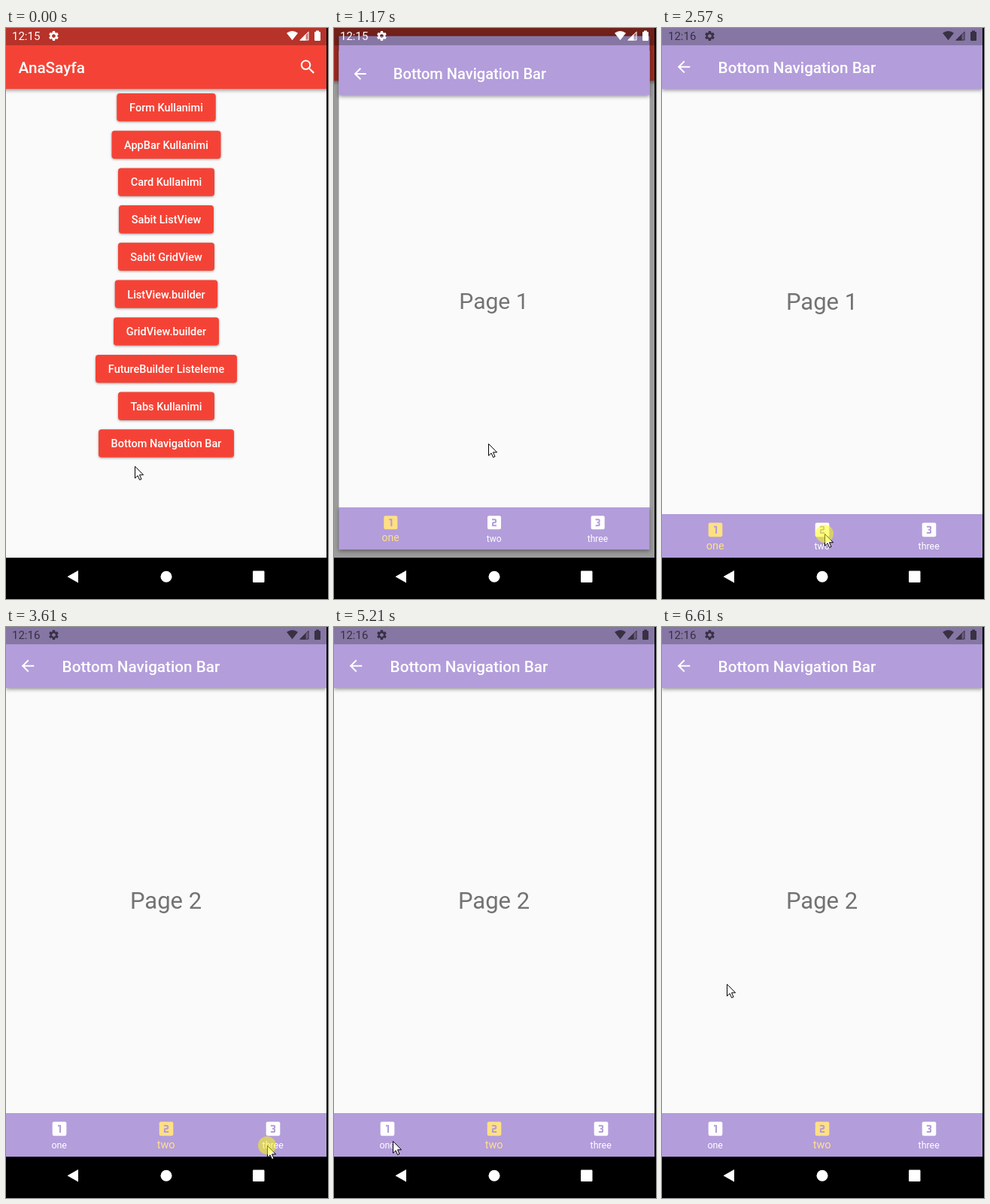
Write an HTML page that moves like this. It is 428 by 760 pixels and loops after 7010 ms.

```html
<!DOCTYPE html>
<html lang="tr">
<head>
<meta charset="utf-8">
<title>AnaSayfa</title>
<style>
  html, body { margin: 0; width: 100%; height: 100%; overflow: hidden; background: #000; }
  svg { display: block; width: 428px; height: 760px; font-family: Roboto, Arial, sans-serif; }
  .title { font-size: 20.7px; font-weight: 500; fill: #fff; }
  .label { font-size: 14.5px; font-weight: 500; fill: #fff; text-anchor: middle; }
  .page { font-size: 31px; fill: #737373; text-anchor: middle; }
  .tab { text-anchor: middle; }
  .btn { fill: #f44336; filter: drop-shadow(0 1.5px 1.5px rgba(0,0,0,.36)); }
  .bar { filter: drop-shadow(0 2px 2.5px rgba(0,0,0,.4)); }
</style>
</head>
<body>
<svg viewBox="0 0 428 760">
  <defs>
    <clipPath id="screen"><rect width="426" height="705"/></clipPath>
    <clipPath id="tabClip"><rect y="647" width="426" height="58"/></clipPath>
  </defs>
  <rect width="428" height="760"/>
  <g clip-path="url(#screen)">
    <g id="home">
      <rect width="426" height="705" fill="#fafafa"/>
      <g id="buttons"></g>
      <rect class="bar" x="-10" y="-10" width="446" height="91" fill="#f44336"/>
      <text class="title" x="16.6" y="59.5">AnaSayfa</text>
      <path transform="translate(388.7 39.4) scale(1.036)" fill="#fff" d="M15.5 14h-.79l-.28-.27C15.41 12.59 16 11.11 16 9.5 16 5.91 13.09 3 9.5 3S3 5.91 3 9.5 5.91 16 9.5 16c1.61 0 3.09-.59 4.23-1.57l.27.28v.79l5 4.99L20.49 19l-4.99-5zm-6 0C7.01 14 5 11.99 5 9.5S7.01 5 9.5 5 14 7.01 14 9.5 11.99 14 9.5 14z"/>
    </g>
    <rect id="scrim" width="426" height="705" fill="#000" opacity=".38"/>
    <g id="detail">
      <rect class="bar" y="647" width="426" height="58" fill="#b39ddb"/>
      <rect y="20" width="426" height="627" fill="#fafafa"/>
      <rect class="bar" width="426" height="81" fill="#b39ddb"/>
      <path transform="translate(16.6 39.4) scale(1.036)" fill="#fff" d="M20 11H7.83l5.59-5.59L12 4l-8 8 8 8 1.41-1.41L7.83 13H20v-2z"/>
      <text class="title" x="74.6" y="59.5">Bottom Navigation Bar</text>
      <text class="page" id="page" x="212.5" y="375"></text>
      <circle id="ripple" cy="676" fill="#ffe082" opacity=".14" clip-path="url(#tabClip)"/>
      <g id="tabs"></g>
    </g>
    <rect width="426" height="23" opacity=".25"/>
    <g id="status">
      <text id="clock" x="8" y="16" font-size="15"></text>
      <path transform="translate(55.4 2.5) scale(.67)" d="M19.14 12.94c.04-.3.06-.61.06-.94 0-.32-.02-.64-.07-.94l2.03-1.58c.18-.14.23-.41.12-.61l-1.92-3.32c-.12-.22-.37-.29-.59-.22l-2.39.96c-.5-.38-1.03-.7-1.62-.94l-.36-2.54c-.04-.24-.24-.41-.48-.41h-3.84c-.24 0-.43.17-.47.41l-.36 2.54c-.59.24-1.13.57-1.62.94l-2.39-.96c-.22-.08-.47 0-.59.22L2.74 8.87c-.12.21-.08.47.12.61l2.03 1.58c-.05.3-.09.63-.09.94s.02.64.07.94l-2.03 1.58c-.18.14-.23.41-.12.61l1.92 3.32c.12.22.37.29.59.22l2.39-.96c.5.38 1.03.7 1.62.94l.36 2.54c.05.24.24.41.48.41h3.84c.24 0 .44-.17.47-.41l.36-2.54c.59-.24 1.13-.56 1.62-.94l2.39.96c.22.08.47 0 .59-.22l1.92-3.32c.12-.22.07-.47-.12-.61l-2.01-1.58zM12 15.6c-1.98 0-3.6-1.62-3.6-3.6s1.62-3.6 3.6-3.6 3.6 1.62 3.6 3.6-1.62 3.6-3.6 3.6z"/>
      <path d="M373 6.8Q380.5 1.2 388 6.8L380.5 16.3Z"/>
      <path d="M390 16.5H402.5V4Z" opacity=".35"/>
      <path d="M390 16.5H398.5V8Z"/>
      <path d="M391.2 16H402V5.2Z" fill="none" stroke="currentColor" stroke-width=".9"/>
      <path d="M412 3.5h4v1.4h1q1 0 1 1V16q0 1-1 1h-6q-1 0-1-1V5.9q0-1 1-1h1z"/>
    </g>
  </g>
  <g fill="#fff">
    <path d="M81.5 730.3L96 722V738.6Z"/>
    <circle cx="213" cy="730.3" r="7.5"/>
    <rect x="328" y="722.5" width="15.5" height="15.5" rx="1.2"/>
  </g>
  <g id="cursor">
    <path d="M.5.5V16.2L4.1 12.8 6.6 18.5 9 17.4 6.5 11.8H11.6Z" fill="#fff" stroke="#000"/>
    <circle id="press" r="12" fill="#ff0" opacity=".5"/>
  </g>
</svg>
<script>
const LOOP = 7010;
const $ = id => document.getElementById(id);

function add(parent, tag, attrs, text) {
  const el = document.createElementNS('http://www.w3.org/2000/svg', tag);
  for (const k in attrs) el.setAttribute(k, attrs[k]);
  if (text) el.textContent = text;
  parent.appendChild(el);
  return el;
}

// Home buttons: caption and width
[['Form Kullanimi', 131.5], ['AppBar Kullanimi', 145], ['Card Kullanimi', 128],
 ['Sabit ListView', 126], ['Sabit GridView', 128], ['ListView.builder', 136.5],
 ['GridView.builder', 140], ['FutureBuilder Listeleme', 188],
 ['Tabs Kullanimi', 128], ['Bottom Navigation Bar', 180]
].forEach(([name, w], i) => {
  const y = 87 + i * 49.7;
  add($('buttons'), 'rect', { class: 'btn', x: 213 - w / 2, y, width: w, height: 37.3, rx: 4 });
  add($('buttons'), 'text', { class: 'label', x: 213, y: y + 24 }, name);
});

// Bottom tabs
const frame = 'M19 3H5c-1.1 0-2 .9-2 2v14c0 1.1.9 2 2 2h14c1.1 0 2-.9 2-2V5c0-1.1-.9-2-2-2z';
const tabX = n => 71 + (n - 1) * 142;
const tabs = [
  ['one', 'm-5 14h-2V9h-2V7h4v10z'],
  ['two', 'm-4 8c0 1.11-.9 2-2 2h-2v2h4v2H9v-4c0-1.11.9-2 2-2h2V9H9V7h4c1.1 0 2 .89 2 2v2z'],
  ['three', 'm-4 7.5c0 .83-.67 1.5-1.5 1.5.83 0 1.5.67 1.5 1.5V15c0 1.11-.9 2-2 2H9v-2h4v-2h-2v-2h2V9H9V7h4c1.1 0 2 .89 2 2v1.5z']
].map(([name, digit], i) => {
  const x = tabX(i + 1);
  const g = add($('tabs'), 'g', {});
  add(g, 'path', { d: frame + digit, transform: `translate(${x - 12.43} 655.4) scale(1.036)` });
  return { g, text: add(g, 'text', { class: 'tab', x: x - .3 }, name) };
});

const lerp = (a, b, p) => a + (b - a) * p;

function setTab({ g, text }, p) {
  g.setAttribute('fill', `rgb(255,${lerp(255, 224, p)},${lerp(255, 130, p)})`);
  text.setAttribute('font-size', lerp(12.43, 14.5, p));
  text.setAttribute('y', lerp(694.2, 693.6, p));
}

// time, cursor x, cursor y, change of state
// page, clock stay until changed; zoom, press, from, mix, ripple last one step
const steps = [
  [0, 171, 583, { page: 0, clock: '12:15' }],
  [200, 205, 546],
  [570, 205, 553],
  [970, 205, 553, { press: 1 }],
  [1170, 205, 553, { page: 1, zoom: 1 }],
  [1370, 205, 553],
  [1570, 205, 568],
  [1770, 203, 632],
  [1970, 202, 671],
  [2170, 216, 673],
  [2570, 216, 673, { press: 1, clock: '12:16' }],
  [2790, 216, 673, { page: 2, from: 1, mix: .15, ripple: 36 }],
  [2990, 236, 688],
  [3190, 325, 702],
  [3410, 347, 690],
  [3610, 347, 690, { press: 1 }],
  [3810, 347, 690, { page: 3, from: 2, mix: .15, ripple: 16 }],
  [4010, 347, 690],
  [4210, 325, 700],
  [4410, 226, 679, { press: 1 }],
  [4610, 226, 679, { page: 2, from: 3, mix: .15, ripple: 36 }],
  [4810, 226, 679],
  [5010, 183, 700],
  [5210, 78, 684],
  [5410, 75, 680, { press: 1 }],
  [5610, 75, 680, { page: 1, from: 2, mix: .15, ripple: 12 }],
  [5810, 183, 696],
  [6010, 217, 676, { press: 1 }],
  [6210, 217, 676, { page: 2, from: 1, mix: .15, ripple: 36 }],
  [6410, 182, 610],
  [6610, 86, 475]
];
let kept = {};
const states = steps.map(([t, x, y, change]) => {
  const s = { ...kept, ...change, t, x, y };
  kept = { page: s.page, clock: s.clock };
  return s;
});

const show = (id, on) => $(id).setAttribute('visibility', on ? 'visible' : 'hidden');
const zoomAt = k => `translate(213 352.5) scale(${k}) translate(-213 -352.5)`;

function draw(s) {
  const light = !s.page || s.zoom;
  show('home', light);
  show('scrim', s.zoom);
  show('detail', s.page);
  show('press', s.press);
  show('ripple', s.ripple);
  $('home').setAttribute('transform', zoomAt(s.zoom ? 1.04 : 1));
  $('detail').setAttribute('transform', zoomAt(s.zoom ? .9695 : 1));
  $('page').textContent = 'Page ' + s.page;
  $('clock').textContent = s.clock;
  const ink = light ? '#fff' : '#383145';
  $('status').setAttribute('fill', ink);
  $('status').setAttribute('color', ink);
  $('cursor').setAttribute('transform', `translate(${s.x} ${s.y})`);
  $('ripple').setAttribute('cx', tabX(s.page));
  $('ripple').setAttribute('r', s.ripple || 0);
  const mix = s.mix ?? 1;
  tabs.forEach((tab, i) =>
    setTab(tab, i + 1 === s.page ? mix : i + 1 === s.from ? 1 - mix : 0));
}

let last;
const start = performance.now();
function tick() {
  const t = (performance.now() - start) % LOOP;
  const s = states.findLast(k => k.t <= t) || states[0];
  if (s !== last) draw(last = s);
  requestAnimationFrame(tick);
}
tick();
</script>
</body>
</html>
```
